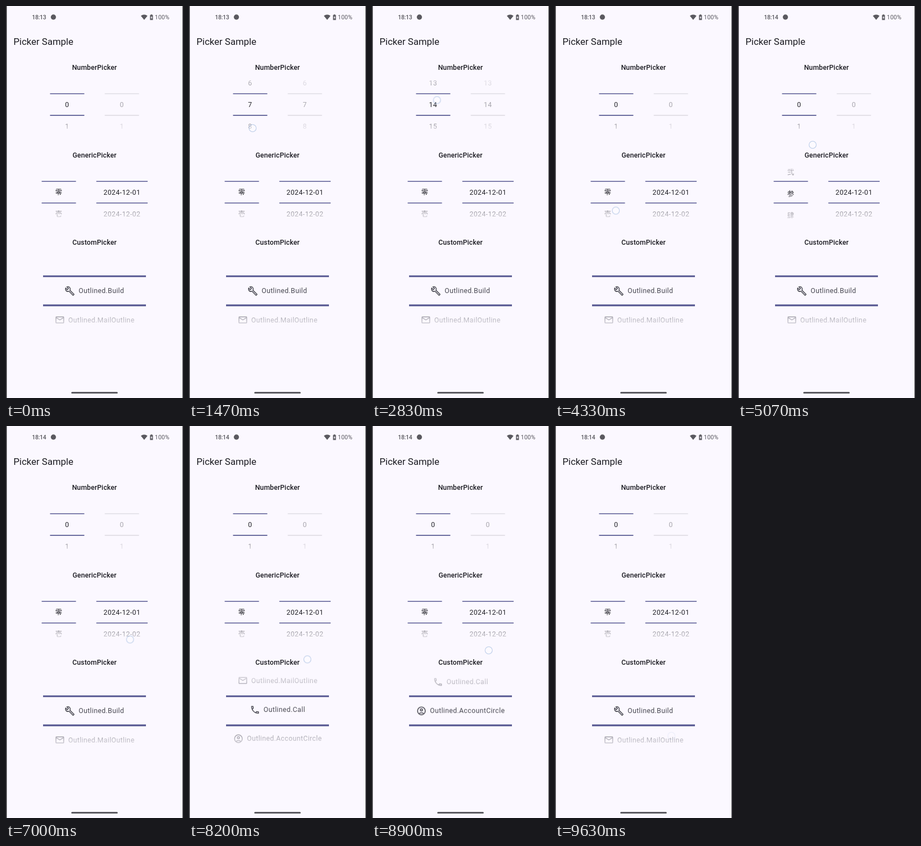
These frames come from a looping animation (320x706 px, 9.7 s). An HTML page:

```html
<!DOCTYPE html>
<html lang="en">
<head>
<meta charset="utf-8">
<title>Picker Sample</title>
<style>
html, body { margin: 0; width: 100%; height: 100%; overflow: hidden; }
body {
  position: relative; background: #fbf8ff; color: #1b1b21;
  font: 12.46px/20px Roboto, "Noto Sans CJK JP", "Noto Sans CJK", sans-serif;
  white-space: nowrap;
}
body > * { position: absolute; }
.chrome { left: 0; top: 0; width: 320px; height: 706px; }
.status { top: 10.6px; font-size: 10.6px; color: #5a595f; }
.clock { left: 47px; font-weight: 500; letter-spacing: -.25px; }
.charge { left: 269px; letter-spacing: .2px; }
.before { animation: before 9.7s step-end infinite; }
.after { animation: after 9.7s step-end infinite; }
h1 { left: 13.6px; top: 54px; margin: 0; font-size: 17px; font-weight: 400; }
h2 { left: 0; width: 320px; margin: 0; text-align: center; font-size: 12.46px; font-weight: 500; letter-spacing: .117px; }

.picker { --h: 39px; height: calc(var(--h) * 3); line-height: var(--h); letter-spacing: .39px; text-align: center; }
.view {
  height: 100%; overflow: hidden;
  -webkit-mask-image: linear-gradient(transparent, #000 50%, transparent);
  mask-image: linear-gradient(transparent, #000 50%, transparent);
}
.list { padding-top: var(--h); animation: 9.7s linear infinite; }
.row { height: var(--h); display: flex; align-items: center; justify-content: center; gap: 6.2px; }
.row svg { width: 18.7px; height: 18.7px; fill: currentColor; }
.row .line { fill: none; stroke: currentColor; stroke-width: 2; }
.off .view { opacity: .38; }
.custom { --h: 52.4px; line-height: 20px; color: #46464f; }

#num .list, #twin .list { animation-name: numbers; }
#kanji .list { animation-name: kanji; }
#date .list { animation-name: dates; }
#icons .list { animation-name: icons; }

.touch {
  left: -7px; top: -7px; width: 14px; height: 14px; box-sizing: border-box;
  border: 1px solid rgba(110, 150, 205, .48); border-radius: 50%; background: rgba(255, 255, 255, .25);
  animation: drag 9.7s linear infinite, press 9.7s step-end infinite;
}

@keyframes before { 0% { opacity: 1; } 46.08%, 100% { opacity: 0; } }
@keyframes after { 0% { opacity: 0; } 46.08%, 100% { opacity: 1; } }

@keyframes numbers {
  0%, 3.1% { transform: none; }
  5.8% { transform: translateY(calc(var(--h) * -2.6)); animation-timing-function: cubic-bezier(.15, .5, .3, 1); }
  11.3%, 15.8% { transform: translateY(calc(var(--h) * -7)); }
  18.5% { transform: translateY(calc(var(--h) * -9.5)); animation-timing-function: cubic-bezier(.15, .5, .3, 1); }
  24%, 29.4% { transform: translateY(calc(var(--h) * -14)); }
  31.2% { transform: translateY(calc(var(--h) * -11)); animation-timing-function: cubic-bezier(.2, .5, .6, 1); }
  33.3%, 100% { transform: none; }
}
@keyframes kanji {
  0%, 46.6% { transform: none; }
  52.27% { transform: translateY(calc(var(--h) * -2.92)); animation-timing-function: cubic-bezier(.15, .5, .3, 1); }
  55.9%, 56.9% { transform: translateY(calc(var(--h) * -4)); }
  59.8% { transform: translateY(calc(var(--h) * -.5)); animation-timing-function: ease-out; }
  61%, 100% { transform: none; }
}
@keyframes dates {
  0%, 63.3% { transform: none; }
  65.7% { transform: translateY(calc(var(--h) * -2.8)); animation-timing-function: ease-out; }
  66.7%, 68% { transform: translateY(calc(var(--h) * -3)); }
  71.2%, 100% { transform: none; }
}
@keyframes icons {
  0%, 81.7% { transform: none; }
  84.54% { transform: translateY(calc(var(--h) * -2.04)); }
  85.5% { transform: translateY(calc(var(--h) * -2.6)); animation-timing-function: cubic-bezier(.15, .5, .3, 1); }
  90.6%, 91.9% { transform: translateY(calc(var(--h) * -3)); }
  95.9%, 100% { transform: none; }
}
@keyframes drag {
  0%, 2.9% { transform: translate(117px, 225px); }
  5.8%, 6.4% { transform: translate(125px, 120px); }
  15.1%, 15.7% { transform: translate(115px, 220px); }
  18.5%, 18.9% { transform: translate(122px, 120px); }
  29.1%, 29.3% { transform: translate(117.5px, 169.5px); }
  31.2%, 31.6% { transform: translate(118px, 292px); }
  44.6%, 46.1% { transform: translate(110px, 368.5px); }
  52.27%, 52.8% { transform: translate(135px, 250px); }
  56.3%, 56.7% { transform: translate(130px, 247px); }
  59.8%, 60.4% { transform: translate(118px, 390px); }
  62.5%, 63.1% { transform: translate(218.5px, 368px); }
  65.7%, 66.3% { transform: translate(230px, 247px); }
  67.3%, 67.7% { transform: translate(228px, 240px); }
  71.4%, 76.3% { transform: translate(224.3px, 384.5px); }
  80.7%, 81.5% { transform: translate(206px, 532px); }
  84.54% { transform: translate(214px, 420.5px); }
  85.5%, 86% { transform: translate(215px, 390px); }
  91%, 91.6% { transform: translate(211px, 398px); }
  95.9%, 100% { transform: translate(210.5px, 558px); }
}
@keyframes press {
  0%, 6.4%, 18.9%, 31.6%, 52.8%, 60.4%, 66.3%, 76.3%, 86% { opacity: 0; }
  2.37%, 15.15%, 29.16%, 44.63%, 56.38%, 62.57%, 67.3%, 80.7%, 91.02% { opacity: 1; }
  74.9%, 96.5% { opacity: 1; animation-timing-function: linear; }
  98%, 100% { opacity: .25; }
}
</style>
</head>
<body>
<svg class="chrome" viewBox="0 0 320 706">
  <g fill="#17171a">
    <rect width="1.3" height="706"/>
    <rect x="319.2" width=".8" height="706"/>
  </g>
  <g fill="#5a595f">
    <circle cx="85.7" cy="20" r="4.7"/>
    <path d="M243.8 17.7q6-4.2 12 0l-6 7.2z"/>
    <path d="M261.7 15.3h2.6v1h1.3v8.9h-5.2v-8.9h1.3z"/>
    <path d="M263.5 17.8l-2.1 3.5h1.3v2.6l2-3.6h-1.2z" fill="#fbf8ff"/>
    <rect x="118" y="695" width="84" height="3.1" rx="1.5"/>
  </g>
  <g stroke="#575992" stroke-width="1.56">
    <path d="M79.6 158h62m-62 38.9h62M64.5 315.8h62m-62 38.9h62M163.3 315.8h92.8m-92.8 38.9h92.8"/>
    <path d="M67 486.8h186M67 539.1h186" stroke-width="3.1"/>
    <path d="M178.5 158h62m-62 38.9h62" stroke="#1b1b21" stroke-opacity=".12"/>
  </g>
</svg>

<div class="status clock before">18:13</div>
<div class="status clock after">18:14</div>
<div class="status charge">100%</div>

<h1>Picker Sample</h1>
<h2 style="top:101px">NumberPicker</h2>
<h2 style="top:258.7px">GenericPicker</h2>
<h2 style="top:416.4px">CustomPicker</h2>

<div id="num" class="picker" style="left:79.5px;top:119px;width:62px"></div>
<div id="twin" class="picker off" style="left:178.5px;top:119px;width:62px"></div>
<div id="kanji" class="picker" lang="ja" style="left:64.5px;top:277px;width:62px"></div>
<div id="date" class="picker" style="left:163.3px;top:277px;width:92.8px"></div>
<div id="icons" class="picker custom" style="left:67px;top:434.6px;width:186px"></div>

<div class="touch"></div>

<script>
const icons = {
  Build: '<path d="M22.61 18.99l-9.08-9.08c.93-2.34.45-5.1-1.44-7C9.79.61 6.21.4 3.66 2.26L7.5 6.11 6.08 7.52 2.25 3.69C.39 6.23.6 9.82 2.9 12.11c1.86 1.86 4.57 2.35 6.89 1.48l9.11 9.11c.39.39 1.02.39 1.41 0l2.3-2.3c.4-.38.4-1.01 0-1.41zm-3 1.6l-9.46-9.46c-.61.45-1.29.72-2 .82-1.36.2-2.79-.21-3.83-1.25C3.37 9.76 2.93 8.5 3 7.26l3.09 3.09 4.24-4.24-3.09-3.09c1.24-.07 2.49.37 3.44 1.31 1.08 1.08 1.49 2.57 1.24 3.96-.12.71-.42 1.37-.88 1.96l9.45 9.45-.88.89z"/>',
  MailOutline: '<g class="line"><rect x="3" y="5" width="18" height="14" rx="1"/><path d="M3.5 6.8l8.5 5.3 8.5-5.3"/></g>',
  Call: '<path d="M6.54 5c.06.89.21 1.76.45 2.59l-1.2 1.2c-.41-1.2-.67-2.47-.76-3.79h1.51m9.86 12.02c.85.24 1.72.39 2.6.45v1.49c-1.32-.09-2.59-.35-3.8-.75l1.2-1.19M7.5 3H4c-.55 0-1 .45-1 1 0 9.39 7.61 17 17 17 .55 0 1-.45 1-1v-3.49c0-.55-.45-1-1-1-1.24 0-2.45-.2-3.57-.57-.1-.04-.21-.05-.31-.05-.26 0-.51.1-.71.29l-2.2 2.2c-2.83-1.45-5.15-3.76-6.59-6.59l2.2-2.2c.28-.28.36-.67.25-1.02C8.7 6.45 8.5 5.25 8.5 4c0-.55-.45-1-1-1z"/>',
  AccountCircle: '<g class="line"><circle cx="12" cy="12" r="9"/><circle cx="12" cy="9.5" r="2.5"/><path d="M6 18.3q6-4.6 12 0"/></g>'
};

function fill(id, items) {
  const rows = items.map(item => `<div class="row">${item}</div>`).join('');
  document.getElementById(id).innerHTML = `<div class="view"><div class="list">${rows}</div></div>`;
}

const numbers = Array.from({ length: 18 }, (_, i) => i);
fill('num', numbers);
fill('twin', numbers);
fill('kanji', [...'零壱弐参肆伍陸']);
fill('date', numbers.slice(1, 8).map(n => `2024-12-0${n}`));
fill('icons', Object.entries(icons).map(([name, shape]) =>
  `<svg viewBox="0 0 24 24">${shape}</svg><span>Outlined.${name}</span>`));
</script>
</body>
</html>
```
